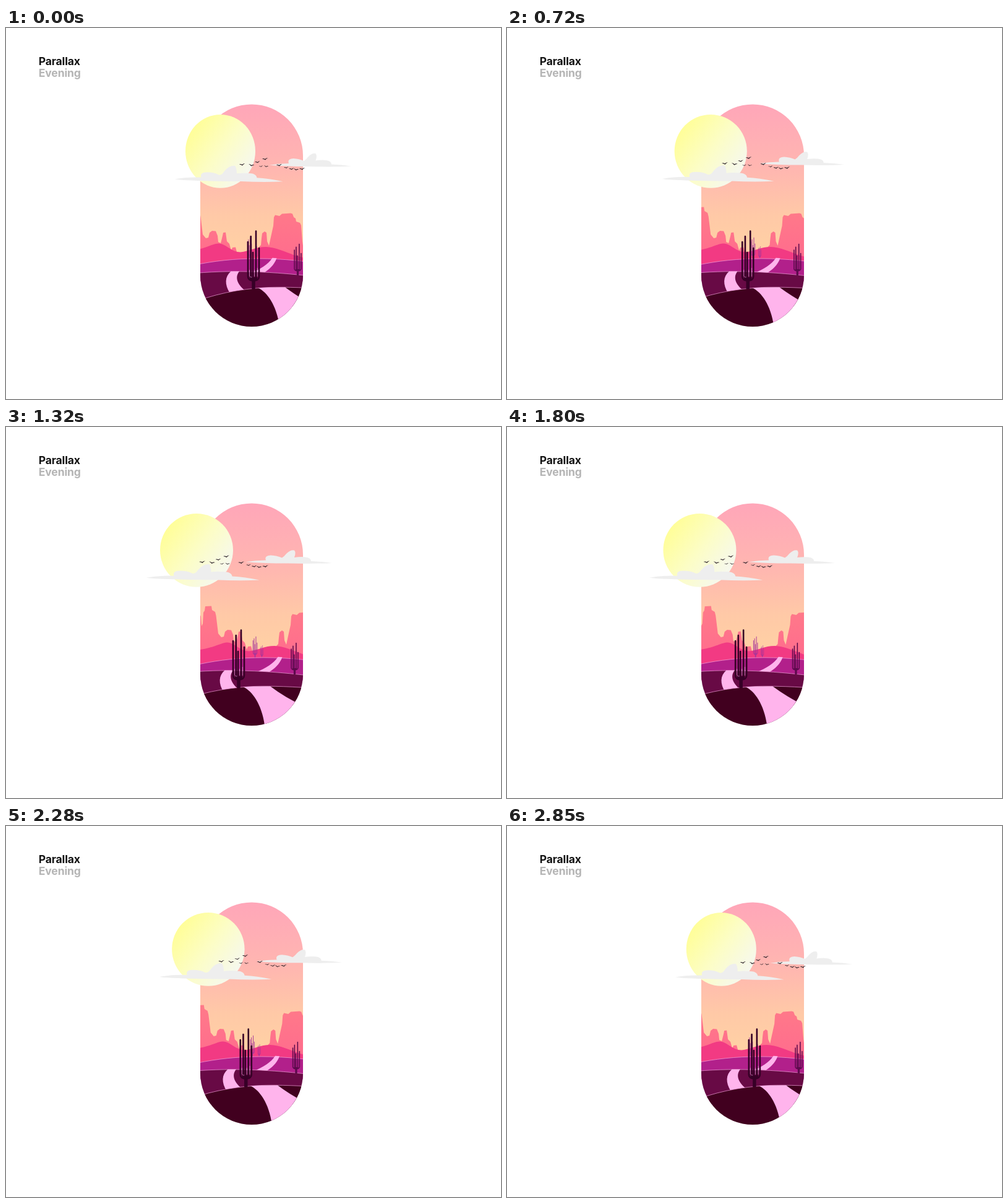
Recreate the animation shown at these times as an HTML page. Size 800 by 600 pixels, loop 2.88 s.

```html
<!DOCTYPE html>
<html lang="en">
<head>
<meta charset="utf-8">
<title>Parallax Evening</title>
<style>
html, body { margin: 0; width: 100%; height: 100%; overflow: hidden; background: #fff; }
svg { display: block; width: 800px; height: 600px; }
text { font: 700 17.6px Inter, "Open Sans", sans-serif; letter-spacing: -.01em; }
.edge { stroke: #f3a3dc; stroke-width: .7; }
.road { fill: #ffb4ec; }
</style>
</head>
<body>
<svg viewBox="0 0 800 600">
  <defs>
    <clipPath id="pill"><rect x="314" y="123.5" width="166" height="359.5" rx="83"/></clipPath>
    <linearGradient id="sky" x1="0" y1="0" x2="0" y2="1">
      <stop offset="0" stop-color="#ffa6b9"/>
      <stop offset=".45" stop-color="#ffb7b0"/>
      <stop offset=".75" stop-color="#ffc9a7"/>
      <stop offset="1" stop-color="#ffd1a4"/>
    </linearGradient>
    <linearGradient id="glow" x1=".08" y1=".25" x2=".85" y2=".85">
      <stop offset="0" stop-color="#fffe9a"/>
      <stop offset=".5" stop-color="#fcfdc6"/>
      <stop offset="1" stop-color="#f6f8ee"/>
    </linearGradient>
    <linearGradient id="rock" gradientUnits="userSpaceOnUse" x1="0" y1="290" x2="0" y2="370">
      <stop offset="0" stop-color="#ff7a89"/>
      <stop offset="1" stop-color="#ff6d8d"/>
    </linearGradient>
    <g id="cactus" fill="none" stroke-linecap="round" stroke-width="2.6">
      <path d="M-9-75V-19Q-9-13 0-12Q9-13 9-19V-65M-4.300-84V-14M4-92.500V-13M-1-58V-13"/>
      <path stroke-width="5.500" stroke-linecap="butt" d="M0-16V1M-6-15H6"/>
    </g>
    <path id="bird" d="M-5 0Q-2-1.200 0 .6Q2-1.500 5-1.500Q2 0 .6 1.900Q-2 .6-5 0Z"/>
  </defs>

  <text x="52.800" y="60" fill="#141414">Parallax</text>
  <text x="52.800" y="79" fill="#b5b5b5">Evening</text>

  <g clip-path="url(#pill)">
    <rect x="314" y="123" width="166" height="240" fill="url(#sky)"/>
    <g data-dx="-25" fill="url(#rock)">
      <path d="M290 380V320H305L308 308L313 303L315 306L316 322L318 318L319 300L321 297L322 290L332 289.500L333 296L338 299L339.500 305L343 334L348 340L352 339L354 331L358 328L364 328.500L367 336L368 346L372 348L375 336L376 331L380 330.500L382 345L386 349L389 360L391 355L396 354.500L398 362V380Z"/>
    </g>
    <g data-dx="-28" fill="url(#rock)">
      <path d="M434 380L437 354L440 351L441 340L442 332L446 329L449 331L450 345L453 352L456 338L460 320L461 306L463 302.500L470 304L474 300.500L488 299.500L491 300.500L493 306L496 308L497 313L503 315L505 319L507 345L512 380Z"/>
    </g>
    <g data-dx="-14" fill="#f23a83">
      <path d="M290 362C334 361 345 348.500 358 348.500C370 349 378 362.500 393 362.500C407 361 418 354 434 354C449 354.500 466 362 480 367.500L520 378V395H290Z"/>
    </g>
    <g data-dx="-9">
      <g stroke="#a8359a">
        <use href="#cactus" transform="translate(402.500 372.500) scale(.36)"/>
        <use href="#cactus" transform="translate(413.500 372) scale(.24 .2)"/>
      </g>
      <path class="edge" fill="#b2208b" d="M290 389C350 373 420 367 510 380V410H290Z"/>
      <path class="road" d="M439.500 371.800L446.500 372.200C442 384 434 391 424 397H403C421 390 433 382 439.500 371.800Z"/>
    </g>
    <g data-dx="10">
      <path class="edge" fill="#680a45" d="M285 397.500C350 391 420 393 505 404V450H285Z"/>
      <path class="road" d="M353.500 393.500C343.500 402 343 415 352 429H382C366 418 358 405 367 393.500Z"/>
    </g>
    <g data-dx="5" stroke="#5c0a4c">
      <use href="#cactus" transform="translate(466.500 399.500) scale(.6 .54)"/>
    </g>
    <g data-dx="24">
      <path class="edge" fill="#41001f" d="M270 447C310 431 350 422 400 419.500C430 418.500 465 420 505 423V490H270Z"/>
      <path class="road" d="M383.500 420.300C399 428 415 450 419 490H510V465C480 452 452 438 427 419.200Q405 419 383.500 420.300Z"/>
      <g stroke="#360026">
        <use href="#cactus" transform="translate(376 421)"/>
      </g>
      <path fill="none" stroke="#d79ad0" stroke-width=".7" d="M369.500 391V401Q371 404 373.500 403M377.500 391V402M382.300 388V402"/>
    </g>
  </g>

  <ellipse id="sun" cy="199.300" ry="59.400" fill="url(#glow)"/>
  <g fill="#eee">
    <path id="low" d="M-92 243.800Q-72 239.800-47 240.800Q-50 232.500-37 232.500Q-25 232.500-18 236.500Q-13 238.500-8 231Q0 221 10 222Q13 226 13 234.500Q20 233.500 30 234Q46 233.500 47 241.500Q67 242.500 91 247.500Q60 249 20 247.300Q-40 247-70 245.500Q-84 245-92 243.800Z"/>
    <path id="high" d="M-69 218.200Q-52 215.500-36 215.500Q-39 208-28 207.500Q-18 208-10 211.500Q-6 209-3 205Q4 198 10 199.500Q13 203 10 211Q20 209.500 28 210.500Q37 211.500 37 217Q54 217.500 71 220Q40 221.500 0 220.500Q-40 220.500-69 218.200Z"/>
  </g>
  <g id="flock" fill="#2a2028"></g>
</svg>

<script>
const LOOP = 2880, STEP = 30;
// [time, sway]: 1 is far right, 0 is far left
const keys = [[0, 1], [480, .76], [960, .32], [1320, 0], [1490, -.05],
  [1800, .09], [2280, .49], [2730, .91], [2850, .995]];
const birds = [[-51, 218], [-35, 219], [-25, 214], [-12, 209], [-19, 221], [-10, 221],
  [12, 219], [24, 223], [33, 225], [41, 226], [51, 225]];
const flips = [1, -1, .9, 1, .7, -.8, 1, .8, .9, -.9, 1];

const $ = id => document.getElementById(id);
const layers = [...document.querySelectorAll('[data-dx]')];

birds.forEach(([x, y], i) => {
  const use = document.createElementNS('http://www.w3.org/2000/svg', 'use');
  use.setAttribute('href', '#bird');
  use.setAttribute('transform', `translate(${x} ${y}) scale(${flips[i]} ${Math.abs(flips[i])})`);
  $('flock').append(use);
});

const key = i => {
  const n = keys.length, turn = Math.floor(i / n);
  const [t, v] = keys[i - turn * n];
  return [t + turn * LOOP, v];
};

function tangent(i) {
  const [t0, v0] = key(i - 1), [t1, v1] = key(i), [t2, v2] = key(i + 1);
  const a = t1 - t0, b = t2 - t1;
  return ((v1 - v0) / a * b + (v2 - v1) / b * a) / (a + b);
}

// Periodic cubic through the keys
function sway(t) {
  let i = keys.length - 1;
  while (keys[i][0] > t) i--;
  const [t0, v0] = key(i), [t1, v1] = key(i + 1);
  const h = t1 - t0, u = (t - t0) / h, w = 1 - u;
  return w * w * (1 + 2 * u) * v0 + u * u * (3 - 2 * u) * v1
    + h * u * w * (w * tangent(i) - u * tangent(i + 1));
}

function place(el, x, y = 0, sx = 1) {
  el.setAttribute('transform', `translate(${x.toFixed(2)} ${y.toFixed(2)}) scale(${sx.toFixed(4)} 1)`);
}

function draw(now) {
  const t = Math.floor(now % LOOP / STEP) * STEP;
  const q = sway(t), turn = Math.max(q, 0) ** 2;
  for (const el of layers) place(el, q * el.dataset.dx);
  $('sun').setAttribute('cx', 308 + 38.5 * q);
  $('sun').setAttribute('rx', 59 - 2.5 * turn * Math.max(q, 0));
  place($('low'), 318.5 + 42 * q, .8 * turn, 1 - .044 * turn);
  place($('high'), 456 + 35 * q, 3.5 * turn, 1 - .055 * turn);
  place($('flock'), 368 + 62 * q, 2.5 * turn, 1 - .05 * turn);
}

const start = performance.now();
function tick() {
  draw(performance.now() - start);
  requestAnimationFrame(tick);
}
draw(0);
requestAnimationFrame(tick);
</script>
</body>
</html>
```
